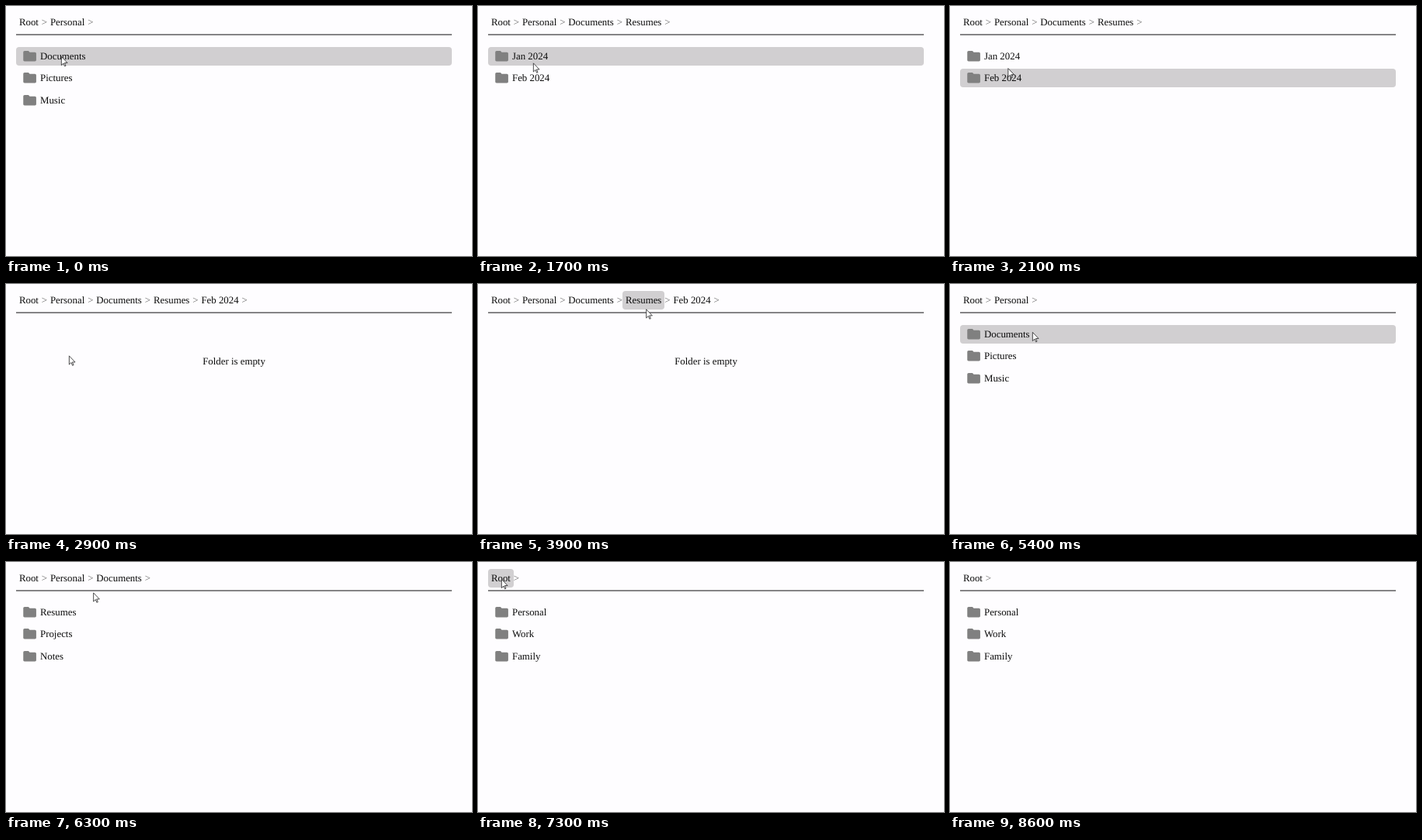
Animation of 600x323 px, one loop 8700 ms. Source, as an HTML page:

```html
<!DOCTYPE html>
<html lang="en">
<head>
<meta charset="utf-8">
<title>Folder navigation</title>
<style>
  html, body { margin: 0; width: 100%; height: 100%; overflow: hidden; background: #fefdff; }
  #stage {
    position: relative; width: 600px; height: 323px; overflow: hidden;
    font: 12.87px/24px "Liberation Serif", "Times New Roman", serif;
    color: #0c0c0c; white-space: nowrap; text-rendering: geometricPrecision;
  }
  #stage > * { position: absolute; }
  #crumbs { left: 13px; top: 9px; display: flex; }
  .crumb { padding: 0 3.9px; border-radius: 4px; }
  .sep { color: #666; }
  #rule { left: 13px; top: 36px; width: 561px; height: 2px; background: #858486; }
  #list { left: 13px; top: 53.2px; width: 561px; }
  .row { position: relative; height: 24px; margin-bottom: 4.2px; padding-left: 31px; border-radius: 4px; }
  .row svg { position: absolute; left: 8px; top: 2px; width: 20px; height: 20px; fill: #808080; }
  .empty { padding-top: 35px; text-align: center; }
  .on { background: #d1cfd1; }
  #cursor { left: 0; top: 0; width: 10px; height: 15px; overflow: visible; }
</style>
</head>
<body>
<div id="stage">
  <div id="crumbs"></div>
  <div id="rule"></div>
  <div id="list"></div>
  <svg id="cursor" viewBox="0 0 10 15">
    <path transform="scale(.7)" d="M.5 .5v16l3.7-3.6 2.4 5.4 2-.9-2.3-5.3h5.2z"
      fill="#fff" stroke="#2a2a2c" stroke-width="1.2"/>
  </svg>
</div>
<script>
const LOOP = 8700, STEP = 100, PRESS = 100, GLIDE = 500;
const FOLDERS = {
  Root: ["Personal", "Work", "Family"],
  Personal: ["Documents", "Pictures", "Music"],
  Documents: ["Resumes", "Projects", "Notes"],
  Resumes: ["Jan 2024", "Feb 2024"],
  "Feb 2024": []
};
const TRAIL = Object.keys(FOLDERS);

// Pointer stops: arrival time, place, and the folder clicked there, if any
const STOPS = [
  [-PRESS, 71, 65, "Personal"],
  [600, 71, 65, "Documents"],
  [1400, 71, 73.5, "Resumes"],
  [2400, 81, 92.5, "Feb 2024"],
  [3500, 245, 122],
  [4000, 213, 22, "Resumes"],
  [4400, 106, 51.5],
  [4900, 82, 22, "Personal"],
  [5400, 106, 62, "Documents"],
  [6300, 112.3, 39.5],
  [6600, 84, 22, "Personal"],
  [7200, 30, 22, "Root"],
  [7900, 290, -40]
].map(([at, x, y, folder]) => ({ at, x, y, folder, leave: folder ? at + PRESS : at }));

const $ = id => document.getElementById(id);
const ICON = '<svg viewBox=".5 .3 24 24"><path d="M10 4H4c-1.1 0-2 .9-2 2v12c0 1.1.9 2 2 2h16c1.1 0 2-.9 2-2V8c0-1.1-.9-2-2-2h-8z"/></svg>';
let open;

function show(folder) {
  if (folder === open) return;
  open = folder;
  $("crumbs").innerHTML = TRAIL.slice(0, TRAIL.indexOf(folder) + 1)
    .map(name => `<span class="crumb">${name}</span><span class="sep">&gt;</span>`).join("");
  $("list").innerHTML = FOLDERS[folder].map(name => `<div class="row">${ICON}${name}</div>`).join("")
    || '<div class="empty">Folder is empty</div>';
}

// Rest at each stop, then ease to the next within at most GLIDE ms
function pointer(t) {
  const next = STOPS.findIndex(s => s.at > t);
  if (next < 0) return STOPS[STOPS.length - 1];
  const a = STOPS[next - 1], b = STOPS[next];
  const from = Math.max(a.leave, b.at - GLIDE);
  const p = Math.max(0, (t - from) / (b.at - from));
  const k = p * p * (3 - 2 * p);
  return { x: a.x + (b.x - a.x) * k, y: a.y + (b.y - a.y) * k };
}

function hover(selector, { x, y }, slack) {
  for (const el of document.querySelectorAll(selector)) {
    const r = el.getBoundingClientRect();
    el.classList.toggle("on",
      x >= r.left && x < r.right && y >= r.top - slack && y < r.bottom + slack);
  }
}

function draw(now) {
  const t = Math.floor(now % LOOP / STEP) * STEP;
  show(STOPS.filter(s => s.folder && s.leave <= t).pop().folder);
  const tip = pointer(t);
  $("cursor").style.transform = `translate(${tip.x}px, ${tip.y}px)`;
  hover(".row", tip, 2);
  hover(".crumb", tip, 0);
}

const start = performance.now();
function tick() {
  draw(performance.now() - start);
  requestAnimationFrame(tick);
}
tick();
</script>
</body>
</html>
```
